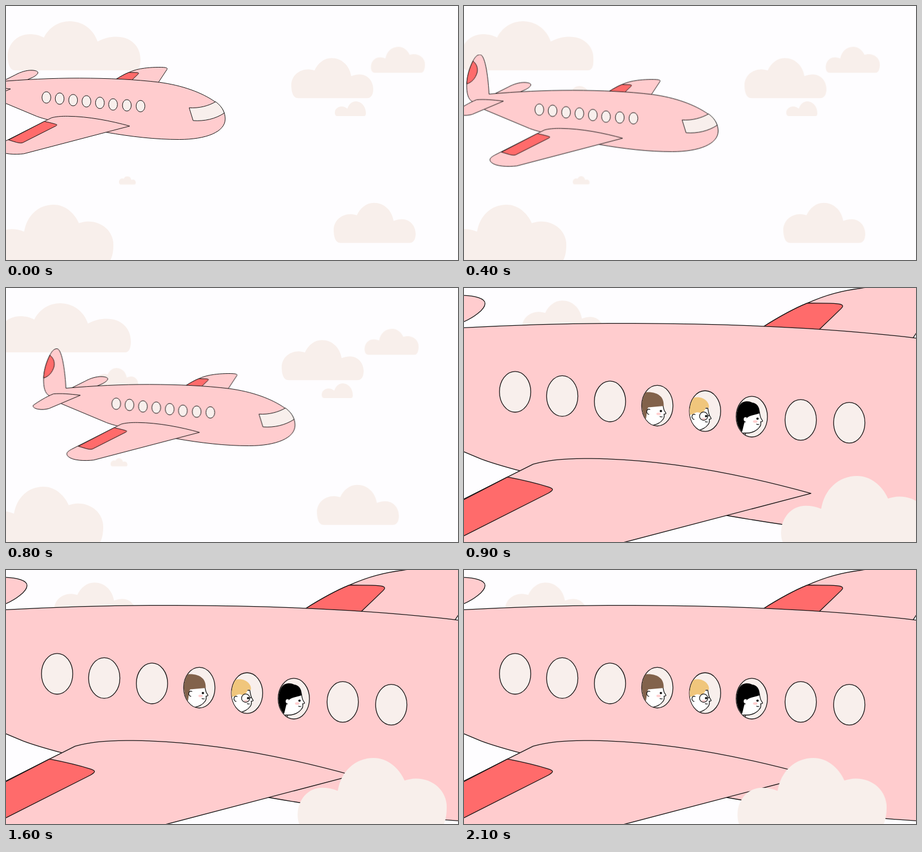
These frames come from a looping animation (800 px wide and 450 px high, 2.2 s). An HTML page:

```html
<!DOCTYPE html>
<html lang="en">
<head>
<meta charset="utf-8">
<title>Pink plane</title>
<style>
  html, body { margin: 0; width: 100%; height: 100%; overflow: hidden; background: #fefdff; }
  svg { display: block; width: 100vw; height: 100vh; }

  .cloud { fill: #f8efeb; }
  .pink { fill: #ffccce; }
  .red { fill: #ff6b6b; }
  .glass { fill: #f8efec; }
  .white { fill: #fff; }
  .blush { fill: #ffd0d0; stroke: none; }
  .line { fill: none; }
  .ink { stroke: #111; stroke-linejoin: round; }
  .plane path, .plane ellipse { vector-effect: non-scaling-stroke; }
  .hair { stroke: none; }

  /* --x and --y are the travel per tick; one loop has 22 ticks */
  .drift { animation: drift 2.2s steps(22) infinite; }
  .far { stroke-width: 1; animation: far 2.2s step-end infinite; }
  .near { stroke-width: 1.3; animation: near 2.2s step-end infinite; }

  @keyframes drift {
    from { transform: translate(0px, 0px); }
    to { transform: translate(calc(22 * var(--x)), calc(22 * var(--y, 0px))); }
  }
  @keyframes far {
    0% { visibility: visible; }
    40.909%, 100% { visibility: hidden; }
  }
  @keyframes near {
    0% { visibility: hidden; }
    40.909%, 100% { visibility: visible; }
  }
</style>
</head>
<body>
<svg viewBox="0 0 800 450">
  <defs>
    <path id="cloud" d="M12 71C3 71 0 60 0 48C0 32 13 20 30 20C34 20 38 21 41 22C47 9 58 0 71 0C89 0 103 13 106 32C111 30 116 29 121 29C135 29 145 41 145 55C145 65 141 71 134 71Z"/>
    <ellipse id="pane" rx="7.8" ry="10.15" vector-effect="non-scaling-stroke"/>

    <g id="plane" class="plane">
      <!-- far tail and wing -->
      <path class="pink" d="M116 177L140 165C149 160 160 156.5 169.5 156.9C175 157.1 180 158.4 180 160.9C180 164 174 168 169.5 170L158 175Z"/>
      <path class="pink" d="M318.6 172.6C325.6 168.2 333.6 163.6 340.8 160.7C350 156.5 358 154.5 368.1 153.2C380 151.5 398 151 405 152C409 152.5 409.5 154 408 156L392.5 179.5Z"/>
      <path class="red" d="M318.6 172.6C325.6 168.2 333.6 163.6 340.8 160.7L352 160.8C357 160.9 359.8 161.4 357.5 163.5L345.5 175Z"/>

      <!-- body and fin -->
      <path class="pink" d="M106 177.5C155 173.2 205 170.7 254 170.8C305 171 352 173 395 178.2C435 183.5 470 196 494 213C506 221 511.5 232 511.5 243C511.5 266 478 279.5 430 279.5C388 279.5 345 274.5 300.5 266.7L197.7 244.5C191 242.7 184 240.8 178 238.5L98 205C88 200 80 194 77 191C68.5 187 66 175 66.5 159.5C67 146 71 132 77.5 119C81 112 85 107.5 90 107.5C100 107.5 105 155 106 177.5Z"/>
      <path class="red" d="M77.5 119C71 132 67 146 66.5 159.5C75 157 82 150 85 139C86.5 131 84 124 77.5 119Z"/>
      <path class="glass" d="M447.7 223.3C465 224.5 482 220 494.5 212.6C502 218 507.5 225 509.8 232.7C494 243 475 247.5 454.7 246Z"/>
      <g class="glass">
        <use href="#pane" x="195" y="205"/>
        <use href="#pane" x="218.5" y="207.1"/>
        <use href="#pane" x="242.3" y="209.8"/>
        <use href="#pane" x="265.9" y="211.9"/>
        <use href="#pane" x="289.7" y="214.6"/>
        <use href="#pane" x="313" y="217.4"/>
        <use href="#pane" x="337.4" y="219"/>
        <use href="#pane" x="361.6" y="220.4"/>
      </g>

      <!-- near tail and wing -->
      <path class="pink" d="M131.5 190C112 187.5 98 186.5 84 187.5C70 193 58 201 49 207C46 209.5 49 213 56 214.5C64 216 70 215 76 213.5Z"/>
      <path class="pink" d="M342.5 255.7C310 246.7 270 238.6 233 238.3C222 238.1 211 239 204 241.1L191.2 247.5L116 285.6C107 290.5 105.5 294 110 298.5C118 306 140 306.5 155 304.8Z"/>
      <path class="red" d="M191.2 247.5C199 249 207 251 211.7 252.5C214.3 253.4 214.3 254 211.7 255.5L153 285.2C150 286.3 146 285.5 142 284.5L128 280.3Z"/>
    </g>

    <!-- profile, placed by its eye -->
    <path id="face" class="white" d="M3 -14C4 -8 5 -3 6 -1L9 4C9 5 7 5.5 5.5 5.5C6.5 9 6 12 3.5 15C0 20 -8 25.5 -20 25.5H-34V-14Z"/>
    <g id="features">
      <path class="white" d="M-19 -2.5C-25 -6.5 -28 4.5 -21 6"/>
      <ellipse class="blush" cx="-4" cy="5" rx="4" ry="2.3"/>
      <circle r="2.1" fill="#111" stroke="none"/>
      <path class="line" d="M-2 9.5Q0 11 3 10"/>
    </g>

    <clipPath id="seat1"><ellipse cx="342" cy="208.5" rx="27.1" ry="35.4"/></clipPath>
    <clipPath id="seat2"><ellipse cx="426.5" cy="218" rx="27.1" ry="35.4"/></clipPath>
    <clipPath id="seat3"><ellipse cx="509.5" cy="228" rx="27.1" ry="35.4"/></clipPath>
  </defs>

  <g class="far">
    <g class="cloud">
      <path class="drift" style="--x:-2.13px" d="M16 114C6 114 3 100 3 89C3 67 20 50 42 50C52 50 60 52 67 56C76 38 93 27 113 27C135 27 155 41 162 63C173 57 184 54.5 195 54.5C220 54.5 238 70 238 95C238 106 235 114 228 114Z"/>
      <path class="drift" style="--x:-2.9px" d="M586 195C583 195 582 191.5 582 189C582 182 588 178 594 178C598 178 601 179.5 604 182C607 174 612 169 619 169C629 169 637 178 637 190C637 193 636 195 634 195Z"/>
      <g class="drift" style="--x:-2.13px"><use href="#cloud" transform="translate(505 92.3)"/></g>
      <g class="drift" style="--x:-1.4px"><use href="#cloud" transform="translate(741.5 72.3) scale(-.66 .65)"/></g>
      <g class="drift" style="--x:-3.7px"><use href="#cloud" transform="translate(580 348.8)"/></g>
      <g class="drift" style="--x:-1.85px"><use href="#cloud" transform="translate(200 301.5) scale(.205)"/></g>
      <g class="drift" style="--x:-2.25px"><use href="#cloud" transform="translate(190 352) scale(-1.49 1.49)"/></g>
      <g class="drift" style="--x:-2.13px"><use href="#cloud" transform="translate(175.6 141.8) scale(.52)"/></g>
    </g>
    <g class="drift ink" style="--x:15.44px;--y:5.38px">
      <use href="#plane" transform="translate(-123.5 -43)"/>
    </g>
  </g>

  <g class="near">
    <g class="drift cloud" style="--x:-2.5px"><use href="#cloud" transform="translate(125.2 22.3)"/></g>
    <g class="ink">
      <use href="#plane" transform="translate(-601.8 -543.8) scale(3.55)"/>

      <g clip-path="url(#seat1)">
        <use href="#face" x="348.5" y="218"/>
        <path class="hair" fill="#82624b" d="M310 187C322 183 340 183 349 193C353 198 353.5 204 353.5 209L326 211.5C323 216 324 228 320 241L308 240Z"/>
        <use href="#features" x="348.5" y="218"/>
      </g>
      <g clip-path="url(#seat2)">
        <use href="#face" x="428.5" y="227"/>
        <path class="hair" fill="#f0c67c" d="M396 201C404 191 422 191 430 201C434 206 434 210 433 213L428 211C427 217 424 221 417 221C412 219 408 222 404 224L396 225Z"/>
        <use href="#features" x="428.5" y="227"/>
        <path class="line" d="M431.5 227A7.3 7.3 0 1 0 416.9 227A7.3 7.3 0 1 0 431.5 227L435 225"/>
      </g>
      <g clip-path="url(#seat3)">
        <use href="#face" x="519.5" y="231.5"/>
        <path class="hair" fill="#000" d="M478 262C474 235 481 212 492 203C500 199 507 201 510 203C519 204 524 212 523 222C515 225 505 226 501 230C495 236 495 248 491 258Z"/>
        <use href="#features" x="519.5" y="231.5"/>
        <path class="line" d="M498 257V263"/>
      </g>
    </g>
    <g class="drift cloud" style="--x:-6.43px"><use href="#cloud" transform="translate(882.9 333) scale(-1.82 1.82)"/></g>
  </g>
</svg>
</body>
</html>
```
